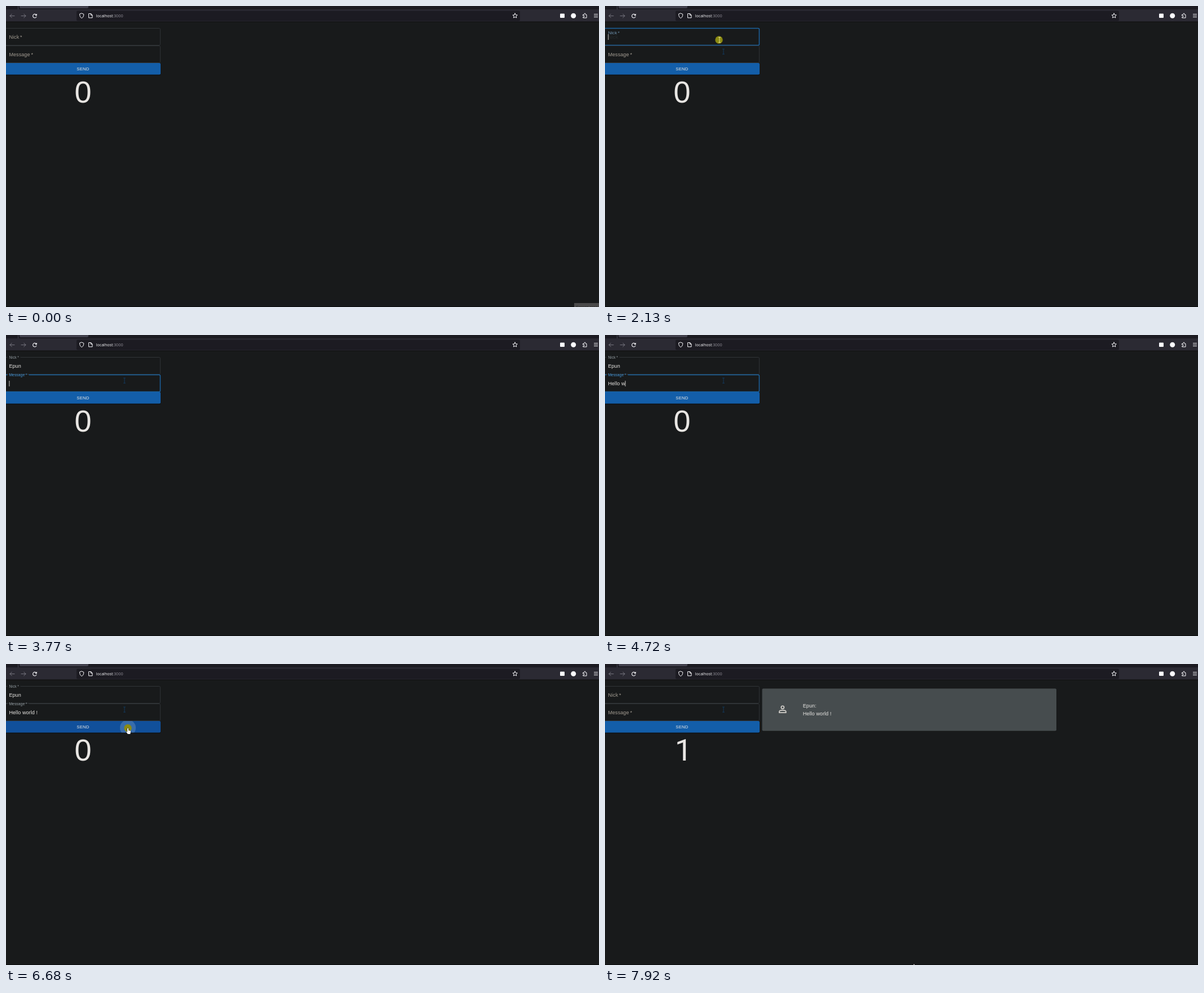
Animation of 1051 by 533 pixels, one loop 7.99 s. Source, as an HTML page with a canvas:

```html
<!DOCTYPE html>
<html lang="en">
<head>
<meta charset="utf-8">
<title>Chat form</title>
<style>
html, body { margin: 0; width: 100%; height: 100%; overflow: hidden; background: #181a1b; }
canvas { display: block; }
</style>
</head>
<body>
<canvas id="stage" width="1051" height="533"></canvas>
<script>
const ctx = document.getElementById('stage').getContext('2d');
const LOOP = 7990;
const SANS = '"Liberation Sans", Arial, sans-serif';
const PALE = '#e8e6e3', GREY = '#a39c92', WHITE = '#fbfbfe', BLUE = '#1b629f';
const NICK = 'Epun', MESSAGE = 'Hello world !';
const FOCUS_NICK = 2078, FOCUS_MESSAGE = 3540, CLICK = 6650, RESET = 6795;

const bursts = [[0, 70, 2], [460, 600, 3], [870, 1920, 16], [2060, 2480, 7], [2680, 2820, 3],
  [3150, 3360, 4], [3560, 3770, 4], [3910, 3910, 1], [4110, 4310, 3], [4510, 4720, 4],
  [4920, 5390, 6], [5720, 5720, 1], [6190, 7580, 21], [7780, 7920, 3]];
const nickKeys = [2680, 3150, 3220, 3360];
const messageKeys = [3910, 4110, 4210, 4310, 4510, 4580, 4720, 4920, 5014, 5108, 5202, 5296, 5390];

// Pointer path: [time, x, y]
const pointerPath = [[460, 980, 523], [530, 868, 486], [600, 779, 460], [870, 752, 445],
  [1150, 440, 255], [1430, 253, 142], [1570, 236, 108], [1640, 223, 94], [1710, 210, 81],
  [1780, 206, 69], [1920, 202, 60], [2200, 202, 60], [2480, 363, 75], [6190, 358, 76],
  [6540, 216, 113], [7020, 216, 115], [7300, 300, 255], [7580, 398, 421],
  [7780, 440, 455], [7920, 547, 531]];

const clamp = v => Math.max(0, Math.min(1, v));
const easeOut = u => 1 - (1 - clamp(u)) ** 2;

function snap(t) {
  const [first, last, count] = bursts.filter(b => b[0] <= t).pop();
  if (count === 1) return first;
  const step = (last - first) / (count - 1);
  return first + step * Math.min(count - 1, Math.floor((t - first) / step + 0.01));
}

function pointerAt(t) {
  const i = pointerPath.findIndex(p => p[0] >= t);
  if (i < 1) return pointerPath[i < 0 ? pointerPath.length - 1 : 0].slice(1);
  const [t0, x0, y0] = pointerPath[i - 1], [t1, x1, y1] = pointerPath[i];
  const u = (t - t0) / (t1 - t0);
  return [x0 + (x1 - x0) * u, y0 + (y1 - y0) * u];
}

function mix(a, b, u) {
  return 'rgb(' + a.map((v, i) => Math.round(v + (b[i] - v) * u)).join(',') + ')';
}

function rect(x, y, w, h, color, radius = 0) {
  ctx.fillStyle = color;
  ctx.beginPath();
  ctx.roundRect(x, y, w, h, radius);
  ctx.fill();
}

function disc(x, y, r, color) {
  ctx.fillStyle = color;
  ctx.beginPath();
  ctx.arc(x, y, r, 0, 7);
  ctx.fill();
}

function text(str, x, y, size, color, { font = SANS, spacing = size * 0.0094, align = 'left' } = {}) {
  ctx.font = `${size}px ${font}`;
  ctx.letterSpacing = spacing + 'px';
  ctx.textAlign = align;
  ctx.fillStyle = color;
  ctx.fillText(str, x, y);
  return ctx.measureText(str).width;
}

function shape(d, x, y, { fill, stroke, width = 1, scale = 1 }) {
  const path = new Path2D(d);
  ctx.save();
  ctx.translate(x, y);
  ctx.scale(scale, scale);
  ctx.lineWidth = width;
  ctx.lineJoin = ctx.lineCap = 'round';
  if (stroke) { ctx.strokeStyle = stroke; ctx.stroke(path); }
  if (fill) { ctx.fillStyle = fill; ctx.fill(path); }
  ctx.restore();
}

function drawBrowser() {
  rect(0, 0, 1051, 6, '#1c1b22');
  rect(21, 0, 1, 6, '#42414d');
  rect(24, -4, 122, 8, '#42414d', 2);
  rect(0, 6, 1051, 22, '#2b2a33');
  rect(0, 27.5, 1051, 1, '#0c0c0d');
  rect(125, 8.5, 786, 18, '#1c1b22', 2.5);

  const arrow = 'M4-0H-4M-.7-3.3L-4 0L-.7 3.3';
  shape(arrow, 11, 17.5, { stroke: '#777680' });
  ctx.save();
  ctx.translate(31, 17.5);
  ctx.scale(-1, 1);
  shape(arrow, 0, 0, { stroke: '#777680' });
  ctx.restore();
  shape('M3 1.2A3.3 3.3 0 1 1 2.2-2.4', 51, 17.7, { stroke: WHITE, width: 1.1 });
  shape('M3.8-4.2V-.6H.3Z', 51, 17.7, { fill: WHITE });
  shape('M0-4.2L3.6-2.8C3.6 1 2.5 3 0 4.3C-2.5 3-3.6 1-3.6-2.8Z', 134.2, 17.2, { stroke: WHITE });
  shape('M-3-3.7H.6L3-1.3V3.7H-3ZM.4-3.5V-1H2.8', 150, 17.2, { stroke: WHITE });
  const ui = { font: '"Open Sans", "Noto Sans", sans-serif', spacing: 0 };
  text('localhost', 159.7, 20.3, 7.1, WHITE, ui);
  text(':3000', 189, 20.3, 7.3, '#918f98', ui);

  let star = '';
  for (let i = 0; i < 10; i++) {
    const r = i % 2 ? 2.1 : 4.4, a = i * Math.PI / 5;
    star += (i ? 'L' : 'M') + (r * Math.sin(a)).toFixed(2) + ' ' + (-r * Math.cos(a)).toFixed(2);
  }
  shape(star + 'Z', 902.2, 17.4, { stroke: WHITE });
  rect(982, 13.5, 8, 7.5, WHITE, 1);
  disc(1005.7, 17.2, 4.5, WHITE);
  shape('M-3.2-1.6H-1.3V-2.6A1.3 1.3 0 0 1 1.3-2.6V-1.6H3V4H-3.2V2.4H-2.2A1.2 1.2 0 0 0-2.2 0H-3.2Z',
    1026, 17, { stroke: WHITE });
  for (const y of [14, 16.6, 19.2]) rect(1042, y, 7, 1, '#d8d8dc');
}

function drawField({ top, label, labelWidth, value, lift, focused, hovered, caret }) {
  const y = top + 0.5, right = 273.4;
  ctx.strokeStyle = focused ? BLUE : hovered ? '#c9c4bd' : '#303437';
  ctx.lineWidth = focused ? 1.5 : 1;
  ctx.beginPath();
  const open = lift > 0.7;
  ctx.moveTo(open ? labelWidth + 2.5 : -5, y);
  ctx.lineTo(right - 2, y);
  ctx.quadraticCurveTo(right, y, right, y + 2);
  ctx.lineTo(right, y + 28);
  ctx.quadraticCurveTo(right, y + 30, right - 2, y + 30);
  ctx.lineTo(-5, y + 30);
  if (open) { ctx.moveTo(-5, y); ctx.lineTo(2.7, y); }
  ctx.stroke();

  const color = focused ? mix([150, 150, 148], [66, 148, 214], lift)
    : lift > 0.9 ? '#929ba0' : GREY;
  text(label + '\u2009*', 5.4, top + 18.6 - lift * 16, 9 - lift * 2.25, color);
  const width = value ? text(value, 5.4, top + 19.2, 9, PALE) : 0;
  if (caret) rect(5.4 + width, top + 11, 1, 10, '#c8c6c3');
}

function drawButton(t) {
  const into = clamp((t - 6430) / 210), out = clamp((t - 7070) / 250);
  rect(-5, 103, 279, 20, '#0e1011', 2);
  ctx.save();
  ctx.beginPath();
  ctx.roundRect(-5, 101, 279, 20.5, 2);
  ctx.clip();
  rect(-5, 101, 279, 21, mix([19, 94, 169], [17, 80, 155], into - out));
  if (t > CLICK && t < 7400) {
    const alpha = t < 6820 ? 0.165 : 0.165 * (7400 - t) / 580;
    disc(216, 113, Math.min(230, (t - CLICK) * 0.53), `rgba(255,255,255,${alpha})`);
  }
  ctx.restore();
  text('SEND', 136.4, 114, 7.7, PALE, { spacing: 0.22, align: 'center' });
}

function drawCard() {
  rect(278.5, 44, 521.5, 75.3, '#101213', 2);
  rect(278.5, 43.5, 521.5, 75, '#464c4e', 2);
  shape('M15 8A3 3 0 1 1 9 8A3 3 0 1 1 15 8ZM5 19V17C5 12.9 19 12.9 19 17V19Z',
    304.6, 70, { stroke: '#d2cfca', width: 2, scale: 0.85 });
  text(NICK + ':', 350.7, 77.4, 9, PALE);
  text(MESSAGE, 350.7, 90.7, 9, PALE);
}

function drawIBeam(x, y, color) {
  shape('M-1.5-4.5H1.5M0-4.5V4.5M-1.5 4.5H1.5', x, y, { stroke: color });
}

function drawPointer(t) {
  if (t < 460 || (t >= 2680 && t < 6190)) return;
  const [x, y] = pointerAt(t);
  const pressed = (t >= 2050 && t < 2200) || (t >= CLICK && t < 6800);
  if (pressed) disc(x, y, 6.7, '#8b8a12');
  const inForm = x < 274;
  if (inForm && y >= 39 && y < 101) {
    drawIBeam(x + 1, y, pressed ? '#d9d88f' : '#dcdcdc');
  } else if (inForm && y >= 101 && y < 122) {
    shape('M-1 .6Q0-.6 1 .6V4L4.3 4.8Q5.3 5.2 5.1 6.5L4.2 10.5H-.2L-2.8 7Q-2.6 5.5-1 6.8Z',
      x, y, { stroke: '#111', fill: '#fff' });
  } else {
    shape('M0 0V9L2.1 7.1L3.6 10.3L5 9.7L3.5 6.6L6.2 6.4Z', x, y, { stroke: '#111', fill: '#fff', width: 0.7 });
  }
}

function draw(t) {
  rect(0, 0, 1051, 533, '#181a1b');
  drawBrowser();
  rect(0, 532, 1051, 1, '#0c0d0e');

  const reset = t >= RESET;
  const typed = (str, keys) => reset ? '' : str.slice(0, keys.filter(k => k <= t + 1).length);
  const lift = start => easeOut((t - start) / 200) - easeOut((t - RESET) / 200);
  const onNick = t >= FOCUS_NICK && t < FOCUS_MESSAGE;
  const onMessage = t >= FOCUS_MESSAGE && t < CLICK;

  if (onNick && t < 2200) text('Nick', 5.4, 57.6, 9, '#262a2c');
  drawField({ top: 39, label: 'Nick', labelWidth: 23, value: typed(NICK, nickKeys),
    lift: lift(FOCUS_NICK), focused: onNick, hovered: t >= 1780 && t < FOCUS_NICK, caret: onNick });
  drawField({ top: 70, label: 'Message', labelWidth: 38, value: typed(MESSAGE, messageKeys),
    lift: lift(FOCUS_MESSAGE), focused: onMessage, hovered: t >= 1640 && t < 1780,
    caret: onMessage && t < 5720 });
  drawButton(t);

  if (reset) text('1', 123.8, 171, 54.5, PALE, { font: 'Roboto, sans-serif', spacing: 0 });
  else text('0', 136.4, 171, 54, PALE, { spacing: 0, align: 'center' });
  if (reset) drawCard();

  if (t >= 1780) drawIBeam(210, 80.7, '#12395c');
  if (t < 70) {
    rect(1007, 526, 44, 7, '#4a4a4a');
    text('Screen area', 1010, 536, 7, '#222');
  }
  drawPointer(t);
}

function tick(now) {
  draw(snap(now % LOOP));
  requestAnimationFrame(tick);
}
draw(0);
requestAnimationFrame(tick);
</script>
</body>
</html>
```
